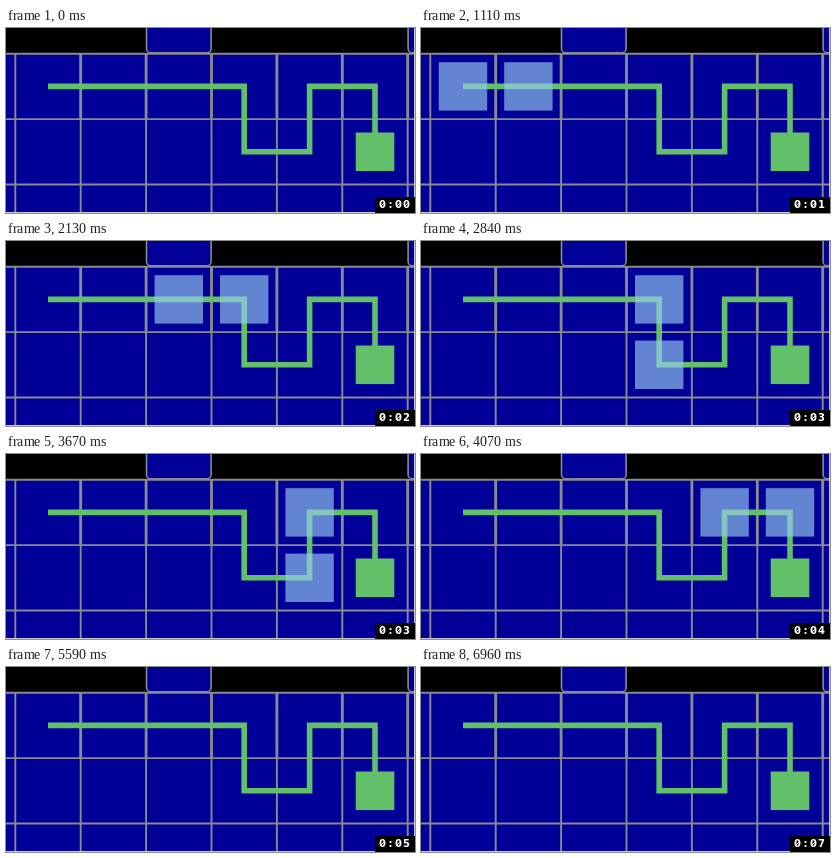
An HTML page with a canvas for the animation above (7.11 s loop, 409 by 185 pixels).

```html
<!DOCTYPE html>
<html lang="en">
<head>
<meta charset="utf-8">
<title>Path on a grid</title>
<style>
html, body { margin: 0; width: 100%; height: 100%; overflow: hidden; background: #000; }
canvas { display: block; }
</style>
</head>
<body>
<canvas id="stage" width="409" height="185"></canvas>
<script>
const ctx = document.getElementById('stage').getContext('2d');
const W = 409, H = 185, LOOP = 7110;
const CELL = 65.4, LEFT = 9.3, TOP = 25.7;
const BLUE = '#000099', GRAY = '#8a8a92', GREEN = '#62c068';

// Path cells as [column, row]
const path = [[0, 0], [1, 0], [2, 0], [3, 0], [3, 1], [4, 1], [4, 0], [5, 0], [5, 1]];
// Times at which the pair of highlights moves on by one cell
const steps = [1110, 1580, 2130, 2690, 3110, 3670, 4070, 4600, 5030, 5590];
const ticks = [990, 1880, 2840, 3950, 4880, 5900, 6960];

const gridX = col => LEFT + col * CELL;
const gridY = row => TOP + row * CELL;
const passed = (times, t) => times.filter(at => t >= at).length;

function fill(x, y, w, h, color) {
  ctx.fillStyle = color;
  ctx.fillRect(x, y, w, h);
}

function square([col, row], size, color) {
  fill(gridX(col + 0.5) - size / 2, gridY(row + 0.5) - size / 2, size, size, color);
}

function line(points, width, color) {
  ctx.beginPath();
  points.forEach(p => ctx.lineTo(...p));
  ctx.strokeStyle = color;
  ctx.lineWidth = width;
  ctx.stroke();
}

function tab(col) {
  ctx.beginPath();
  ctx.roundRect(gridX(col) + 0.4, -10, CELL - 0.8, TOP + 9, 4);
  ctx.fillStyle = BLUE;
  ctx.fill();
  ctx.strokeStyle = GRAY;
  ctx.lineWidth = 1.6;
  ctx.stroke();
}

function drawBoard() {
  tab(2);
  tab(6);
  fill(-10, TOP, W + 20, H, BLUE);
  for (let row = 0; row < 3; row++) {
    line([[-10, gridY(row)], [W + 10, gridY(row)]], 1.9, GRAY);
  }
  for (let col = 0; col < 7; col++) {
    const x = gridX(col);
    line([[x, TOP], [x, H + 10]], 1.9, GRAY);
    // The top row has heavier dividers
    if (col) line([[x, TOP], [x, gridY(1)]], 2.8, GRAY);
  }
}

function drawPath() {
  line(path.map(([col, row]) => [gridX(col + 0.5), gridY(row + 0.5)]), 5.6, GREEN);
  square(path.at(-1), 38.6, GREEN);
}

function drawClock(seconds) {
  fill(369, 169, 40, 16, '#000');
  ctx.fillStyle = '#fff';
  ctx.font = 'bold 10px "DejaVu Sans", sans-serif';
  ctx.textAlign = 'center';
  [...`0:0${seconds}`].forEach((char, i) => {
    const x = 376.5 + i * 8;
    ctx.fillText(char, x, 180);
    if (char === '0') line([[x - 1.5, 178], [x + 1.5, 175]], 1, '#fff');
  });
}

function draw(t) {
  ctx.filter = 'none';
  fill(0, 0, W, H, '#000');
  ctx.filter = 'blur(0.6px)';
  drawBoard();
  drawPath();
  const step = passed(steps, t);
  if (step) {
    path.slice(step - 1, step + 1)
      .forEach(cell => square(cell, 48.4, 'rgba(150, 200, 238, 0.66)'));
  }
  ctx.filter = 'none';
  fill(0, H - 1, W, 1, '#ccc');
  fill(W - 1, 0, 1, H, '#ccc');
  drawClock(passed(ticks, t));
}

const start = performance.now();
function frame() {
  draw((performance.now() - start) % LOOP);
  requestAnimationFrame(frame);
}
frame();
</script>
</body>
</html>
```
